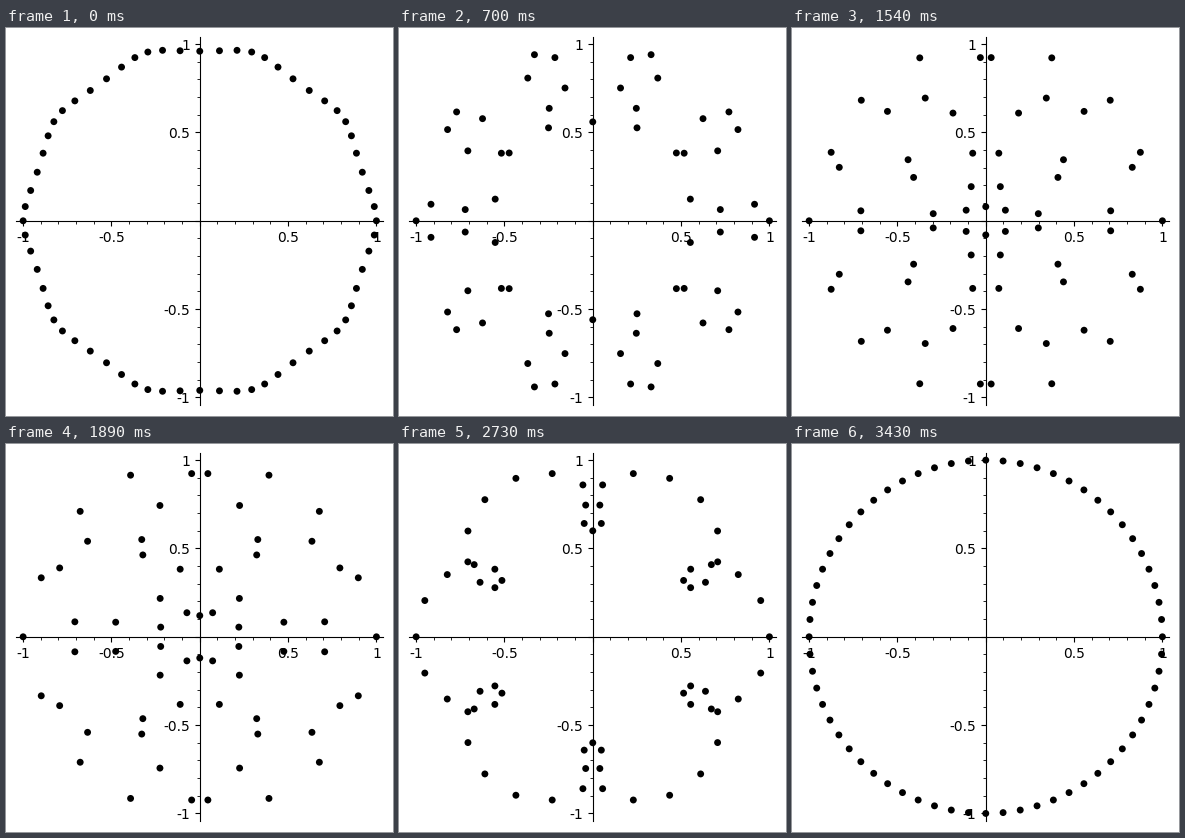
A matplotlib script for the animation above (3500 ms loop, 387 px wide and 388 px high).

```python
import numpy as np
import matplotlib.pyplot as plt
from matplotlib.animation import FuncAnimation
from matplotlib.patches import Circle
from matplotlib.ticker import MultipleLocator

WIDTH, HEIGHT, DPI = 387, 388, 100
FRAMES, INTERVAL = 50, 70
POINTS, POWER = 64, -9
CENTER_X, CENTER_Y = 193.77, 195.2   # pixels from the lower left corner
UNIT, LIMIT = 176.65, 1.04           # pixels per unit, half range of the axes
DOT_RADIUS = 3.45 / UNIT

start = np.exp(2j * np.pi * np.arange(POINTS) / POINTS)
end = start ** POWER


def positions(frame):
    """Slide every point z of the circle in a straight line towards z**POWER."""
    t = (frame + 1) / FRAMES
    return (1 - t) * start + t * end


def style_axes(ax):
    ax.set(xlim=(-LIMIT, LIMIT), ylim=(-LIMIT, LIMIT))
    ax.patch.set_visible(False)
    for side in ("right", "top"):
        ax.spines[side].set_visible(False)
    for side in ("left", "bottom"):
        ax.spines[side].set_position("zero")
        ax.spines[side].set_linewidth(0.8)
    ticks = [-1, -0.5, 0, 0.5, 1]
    labels = [f"{v:g}" if v else "" for v in ticks]
    for axis in (ax.xaxis, ax.yaxis):
        axis.set_ticks(ticks, labels=labels)
        axis.set_minor_locator(MultipleLocator(0.1))
    ax.tick_params(labelsize=10, labelfontfamily="DejaVu Sans")


fig = plt.figure(figsize=(WIDTH / DPI, HEIGHT / DPI), dpi=DPI, facecolor="white")
half = UNIT * LIMIT
ax = fig.add_axes([(CENTER_X - half) / WIDTH, (CENTER_Y - half) / HEIGHT,
                   2 * half / WIDTH, 2 * half / HEIGHT])
style_axes(ax)
# Patches keep their sub-pixel positions, unlike scatter markers.
dots = [ax.add_patch(Circle((z.real, z.imag), DOT_RADIUS, facecolor="black",
                            linewidth=0, zorder=5)) for z in start]


def update(frame):
    for dot, z in zip(dots, positions(frame)):
        dot.center = z.real, z.imag
    return dots


anim = FuncAnimation(fig, update, frames=FRAMES, interval=INTERVAL,
                     repeat=True, repeat_delay=0, blit=False)
plt.show()
```
